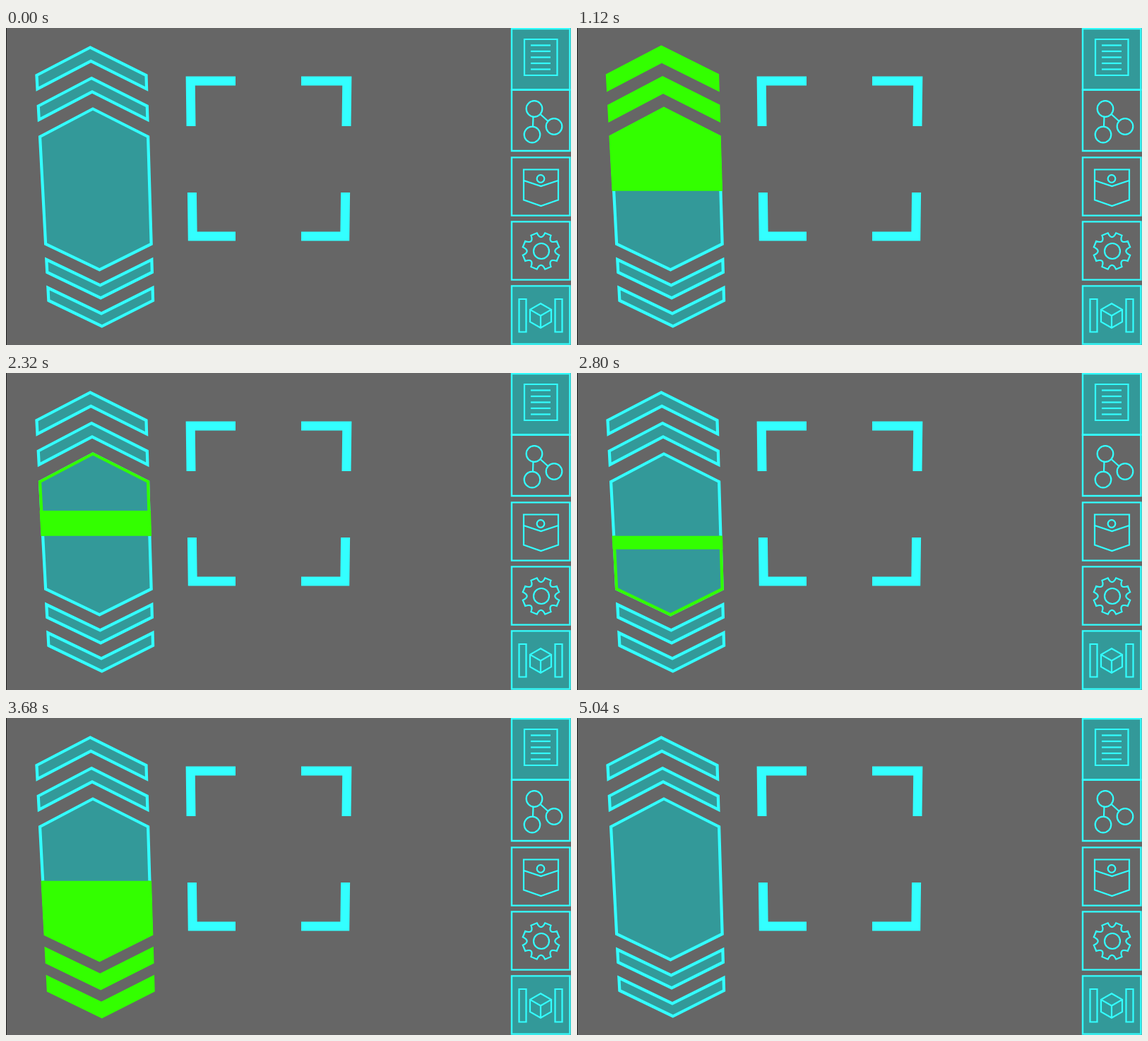
Animation, 800 px wide and 449 px high, one loop 7.12 s. Source, as an HTML page with a canvas:

```html
<!DOCTYPE html>
<html>
<head>
<meta charset="utf-8">
<style>
  html, body { margin: 0; height: 100%; overflow: hidden; background: #666; }
  canvas { display: block; }
</style>
</head>
<body>
<canvas id="stage" width="800" height="449"></canvas>
<script>
const ctx = document.getElementById('stage').getContext('2d');
const CYAN = '#3ff', TEAL = '#399', GREEN = '#3f0', GREY = '#666';
const LOOP = 7120, STEP = 80, MIDDLE = 230.7;

// The two ends of the slider; the lower one is a little shorter.
const TOP = { dir: -1, tip: 114.5, drop: 39.5, spacing: 43.5, thick: 19.3, full: 119 };
const BOTTOM = { dir: 1, tip: 342.5, drop: 36.5, spacing: 40, thick: 18, full: 114 };
const EXTRA = 24; // further pull that lights the outer chevron

function shape(path, fill, stroke, width) {
  const p = new Path2D(path);
  if (fill) { ctx.fillStyle = fill; ctx.fill(p); }
  if (stroke) { ctx.strokeStyle = stroke; ctx.lineWidth = width; ctx.stroke(p); }
}

function clipRows(y1, y2, draw) {
  ctx.save();
  ctx.beginPath();
  ctx.rect(0, y1, 700, y2 - y1);
  ctx.clip();
  draw();
  ctx.restore();
}

const plain = path => shape(path, TEAL, CYAN, 4.2);
const lit = path => shape(path, GREEN, GREEN, 5.2);
const rect = (x, y, w, h) => `M${x} ${y}h${w}v${h}h${-w}Z`;
const circle = (x, y, r) => `M${x + r} ${y}a${r} ${r} 0 1 1 ${-2 * r} 0a${r} ${r} 0 1 1 ${2 * r} 0Z`;

// Side -1, 0 or 1 of the leaning, narrowing slider at height y.
const at = (side, y) => `${118.2 + 0.0415 * y + side * (78.3 - 0.0115 * y)} ${y} `;
const roof = (tip, base, side) => at(-side, base) + at(0, tip) + at(side, base);
const body = 'M' + roof(TOP.tip, TOP.tip + TOP.drop, 1) +
  roof(BOTTOM.tip, BOTTOM.tip - BOTTOM.drop, -1) + 'Z';

function chevron(end, i) {
  const tip = end.tip + end.dir * i * end.spacing;
  const base = tip - end.dir * end.drop;
  const inset = end.dir * end.thick;
  return 'M' + roof(tip, base, 1) + roof(tip - inset, base - inset, -1) + 'Z';
}

function gear(x, y, teeth, outer, valley) {
  const turn = 2 * Math.PI / teeth, half = 0.17;
  const polar = (r, a) => `${x + r * Math.cos(a)} ${y + r * Math.sin(a)} `;
  let path = '';
  for (let i = 0; i < teeth; i++) {
    const a = (i + 0.5) * turn;
    path += (i ? 'L' : 'M') + polar(outer, a - half) + 'L' + polar(outer, a + half) +
      'Q' + polar(valley, a + turn / 2) + polar(outer, a + turn - half);
  }
  return path + 'Z';
}

function drawBrackets() {
  for (const sx of [-1, 1]) for (const sy of [-1, 1]) {
    const x = 372 + sx * (109.3 - 1.5 * sy), y = 185 + 110 * sy;
    shape(`M${371.5 + sx * 46.5} ${y}H${x}L${x + sx * sy * 0.8} ${186 + 47 * sy}`, null, CYAN, 13);
  }
}

function drawMenu() {
  const panel = (y, h, fill) => shape(rect(716, y, 82.4, h), fill, CYAN, 2.4);
  const icon = path => shape(path, null, CYAN, 2.2);
  panel(1, 86.5, TEAL);
  panel(87.5, 86.5);
  [183.4, 274.4, 365.4].forEach((y, i) => panel(y, 82.2, i === 2 && TEAL));

  icon(rect(734, 16, 46.5, 51));
  for (let i = 0; i < 5; i++) icon(`M743 ${24.5 + i * 8.5}h28`);

  icon(circle(748, 114.5, 11.3) + circle(776, 139.5, 11.3) + circle(745, 151, 11.3) +
    'M756.5 122L767.5 132M746.5 126L746 139.5');
  icon('M733 200.5H782V243.5L757.5 252 733 243.5ZM733 216L757.5 224 782 216' +
    circle(757, 213.5, 5.3));
  icon(gear(757.5, 316, 8, 26.3, 14) + circle(758, 316, 11));

  const hex = [...Array(6).keys()].map(i =>
    `${757 + 17.3 * Math.sin(i * Math.PI / 3)} ${407.5 - 17.3 * Math.cos(i * Math.PI / 3)}`);
  icon(rect(726.5, 384, 10, 46.5) + rect(777.5, 384, 10, 46.5) + `M${hex.join('L')}Z` +
    [1, 3, 5].map(i => `M757 407.5L${hex[i]}`).join(''));
}

// A steady pull, a hold, then a release that slows by the power given.
function pull(t, start, held, release, end, power) {
  const part = (a, b) => Math.min(1, Math.max(0, (t - a) / (b - a)));
  return part(start, held) * (1 - part(release, end)) ** power;
}

function drawSlider(end, force) {
  const amount = force * (end.full + EXTRA);
  for (const i of [1, 2])
    (amount >= end.full + (i - 1) * EXTRA ? lit : plain)(chevron(end, i));
  if (!amount) return;
  const rows = (reach, draw) => {
    const edge = MIDDLE + end.dir * reach;
    clipRows(Math.min(MIDDLE, edge), Math.max(MIDDLE, edge), draw);
  };
  rows(240, () => shape(body, TEAL, GREEN, 4.2));
  rows(amount, () => lit(body));
}

function frame(now) {
  const t = Math.floor(now % LOOP / STEP) * STEP;
  ctx.fillStyle = GREY;
  ctx.fillRect(0, 0, 800, 449);
  ctx.fillStyle = '#222';
  ctx.fillRect(0, 0, 1, 449);
  plain(body);
  drawSlider(TOP, pull(t, 150, 1118, 1436, 2668, 1.1));
  drawSlider(BOTTOM, pull(t, 2672, 3598, 4238, 4950, 1.5));
  drawBrackets();
  drawMenu();
  requestAnimationFrame(frame);
}
requestAnimationFrame(frame);
</script>
</body>
</html>
```
